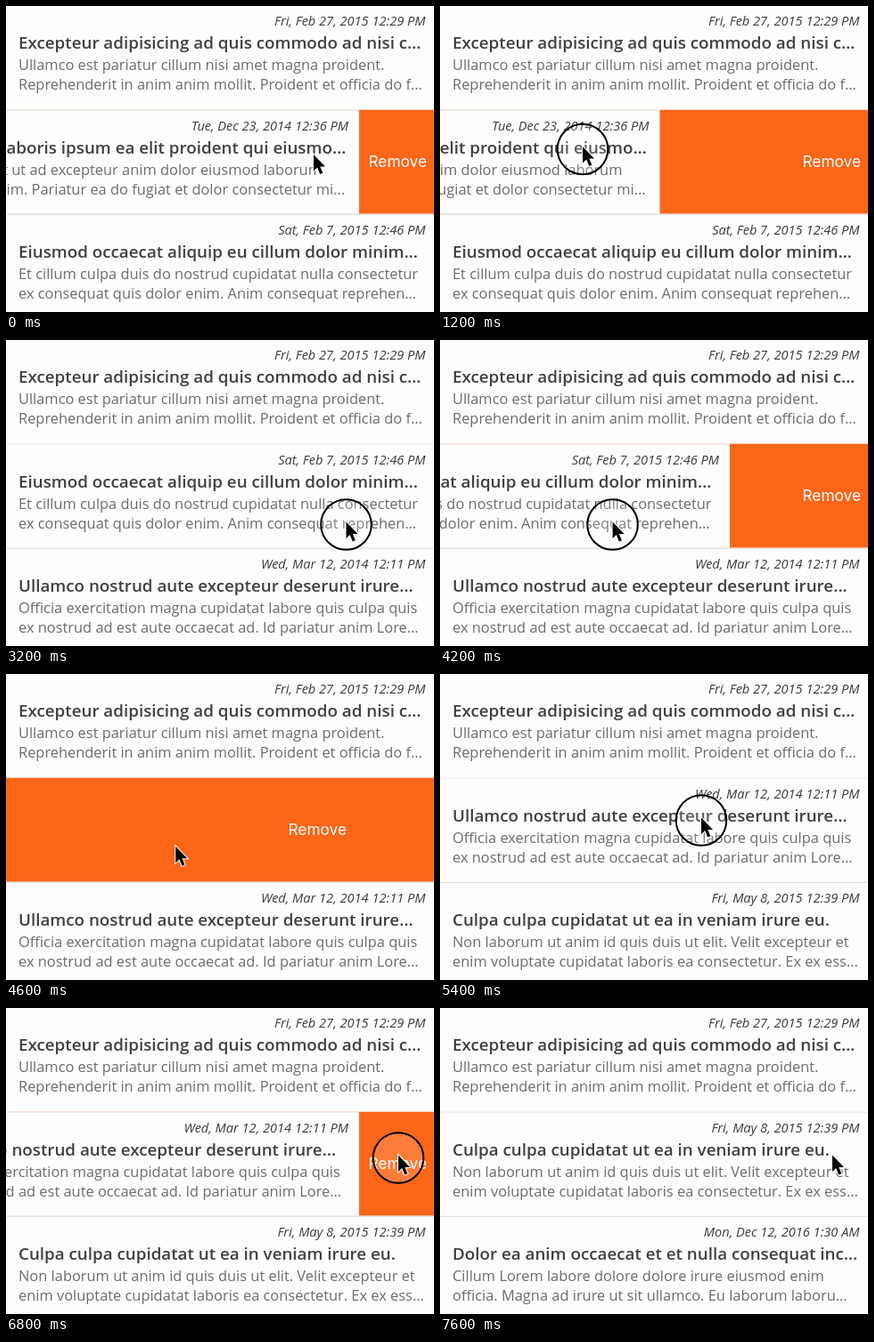
An HTML page with a canvas that plays this animation: 480 px wide and 344 px high, repeating every 7.8 s.

```html
<!DOCTYPE html>
<html lang="en">
<head>
<meta charset="utf-8">
<title>Swipe to remove</title>
<style>
  html, body { margin: 0; width: 100%; height: 100%; overflow: hidden; background: #fdfdfd; }
  canvas { display: block; }
</style>
</head>
<body>
<canvas id="stage" width="480" height="344"></canvas>
<script>
const ctx = document.getElementById('stage').getContext('2d');
const WIDTH = 480, HEIGHT = 344, LOOP = 7800, STEP = 200;
const ROW_HEIGHT = 117.4, ROW_WIDTH = 482.5, LIST_TOP = -1;
const BUTTON = 86.5;

// Every cycle removes one message: drag, fly out, collapse.
const CYCLE = 2400, FIRST_CYCLE = 200, FLY_AT = 1800, COLLAPSE_AT = 2000;
const ARRIVE_EARLY = 200;

const messages = [
  ['Fri, Feb 27, 2015 12:29 PM', 'Excepteur adipisicing ad quis commodo ad nisi c…',
   'Ullamco est pariatur cillum nisi amet magna proident.',
   'Reprehenderit in anim anim mollit. Proident et officia do f…'],
  ['Tue, Dec 23, 2014 12:36 PM', 'Labore laboris ipsum ea elit proident qui eiusmo…',
   'Cupidatat ut ad excepteur anim dolor eiusmod laborum',
   'dolore anim. Pariatur ea do fugiat et dolor consectetur mi…'],
  ['Sat, Feb 7, 2015 12:46 PM', 'Eiusmod occaecat aliquip eu cillum dolor minim…',
   'Et cillum culpa duis do nostrud cupidatat nulla consectetur',
   'ex consequat quis dolor enim. Anim consequat reprehen…'],
  ['Wed, Mar 12, 2014 12:11 PM', 'Ullamco nostrud aute excepteur deserunt irure…',
   'Officia exercitation magna cupidatat labore quis culpa quis',
   'ex nostrud ad est aute occaecat ad. Id pariatur anim Lore…'],
  ['Fri, May 8, 2015 12:39 PM', 'Culpa culpa cupidatat ut ea in veniam irure eu.',
   'Non laborum ut anim id quis duis ut elit. Velit excepteur et',
   'enim voluptate cupidatat laboris ea consectetur. Ex ex ess…'],
  ['Mon, Dec 12, 2016 1:30 AM', 'Dolor ea anim occaecat et et nulla consequat inc…',
   'Cillum Lorem labore dolore dolore irure eiusmod enim',
   'officia. Magna ad irure ut sit ullamco. Eu laborum laboru…']
];

// Pointer strokes: where the pointer goes while down and how far the row follows.
const strokes = [
  { press: 400, lift: 2000, from: [345, 167], to: [-25, 149], row: [-BUTTON, -385.5] },
  { press: 3200, lift: 4400, from: [381.5, 204.5], to: [156, 204.5], row: [0, -189] },
  { press: 5400, lift: 5800, from: [293, 161.5], to: [205, 163], row: [0, -BUTTON] },
  { press: 6400, lift: 6800, from: [440, 169.5], to: [440, 165.5], row: [-BUTTON, -BUTTON] }
];

const mix = (a, b, f) => a + (b - a) * f;
const mixPoint = (a, b, f) => a.map((v, i) => mix(v, b[i], f));
const progress = (t, from, to) => Math.min(1, Math.max(0, (t - from) / (to - from)));

function text(string, x, y, font, color, align = 'left') {
  ctx.font = font;
  ctx.fillStyle = color;
  ctx.textAlign = align;
  ctx.fillText(string, x, y);
}

function box(x, y, w, h, color) {
  ctx.fillStyle = color;
  ctx.fillRect(x, y, w, h);
}

function drawMessage([date, title, line1, line2], top, offset) {
  const x = 14 + offset;
  box(offset, top, ROW_WIDTH, ROW_HEIGHT + 1, '#fdfdfd');
  box(offset, top, ROW_WIDTH, 1, '#dddddd');
  text(date, 470.5 + offset, top + 23.2, 'italic 14.6px "Open Sans", sans-serif', '#3c3c3c', 'right');
  text(title, x, top + 49.2, '600 18.8px "Open Sans", sans-serif', '#404040');
  text(line1, x, top + 73.2, '16.42px "Open Sans", sans-serif', '#6c6c6c');
  text(line2, x, top + 95.3, '16.42px "Open Sans", sans-serif', '#6c6c6c');
}

function drawSwipedRow(message, top, height, offset) {
  ctx.save();
  ctx.beginPath();
  ctx.rect(0, top, WIDTH, height);
  ctx.clip();
  if (offset < 0) {
    const pull = Math.max(0, -offset - WIDTH / 2) * 0.371;
    box(0, top, WIDTH, height, '#fb6618');
    text('Remove', ROW_WIDTH - BUTTON / 2 - pull, top + 65, '17.3px Inter, sans-serif', '#fff', 'center');
  }
  drawMessage(message, top, offset);
  ctx.restore();
}

function drawCursor([x, y], pressed) {
  if (pressed) {
    ctx.beginPath();
    ctx.arc(x, y + 3, 28.3, 0, Math.PI * 2);
    ctx.fillStyle = 'rgba(255,255,255,0.15)';
    ctx.fill();
    ctx.lineWidth = 2;
    ctx.strokeStyle = '#000';
    ctx.stroke();
  }
  ctx.save();
  ctx.translate(x, y);
  const arrow = new Path2D('M0 0V18.5L4.2 14.6L7.2 22L10.3 20.7L7.3 13.6H13Z');
  ctx.lineWidth = 2;
  ctx.strokeStyle = '#fff';
  ctx.stroke(arrow);
  ctx.fillStyle = '#000';
  ctx.fill(arrow);
  ctx.restore();
}

function pointerAt(t, stroke) {
  const { press, lift, from, to } = stroke;
  const next = strokes[strokes.indexOf(stroke) + 1];
  if (t <= lift || !next) return mixPoint(from, to, progress(t, press, lift));
  return mixPoint(to, next.from, progress(t, lift, next.press - ARRIVE_EARLY));
}

function draw(t) {
  const removed = Math.max(0, Math.floor((t - FIRST_CYCLE) / CYCLE));
  const cycleStart = FIRST_CYCLE + removed * CYCLE;
  const phase = t - cycleStart;
  const stroke = strokes.findLast(s => s.press <= t) || strokes[0];
  const { press, lift, row } = stroke;

  const dragged = press < cycleStart ? 0 : mix(...row, progress(t, press, lift));
  const offset = mix(dragged, -ROW_WIDTH, progress(phase, FLY_AT, COLLAPSE_AT));
  const height = ROW_HEIGHT * (1 - progress(phase, COLLAPSE_AT, CYCLE));
  const swipedTop = LIST_TOP + ROW_HEIGHT;
  const [swiped, ...below] = messages.slice(1 + removed);

  box(0, 0, WIDTH, HEIGHT, '#fdfdfd');
  drawMessage(messages[0], LIST_TOP, 0);
  drawSwipedRow(swiped, swipedTop, height, offset);
  below.forEach((message, i) =>
    drawMessage(message, swipedTop + height + i * ROW_HEIGHT, 0));
  drawCursor(pointerAt(t, stroke), t >= press && t <= lift);
}

const start = performance.now();
function tick() {
  const t = (performance.now() - start) % LOOP;
  draw(Math.floor(t / STEP) * STEP);
  requestAnimationFrame(tick);
}
tick();
</script>
</body>
</html>
```
